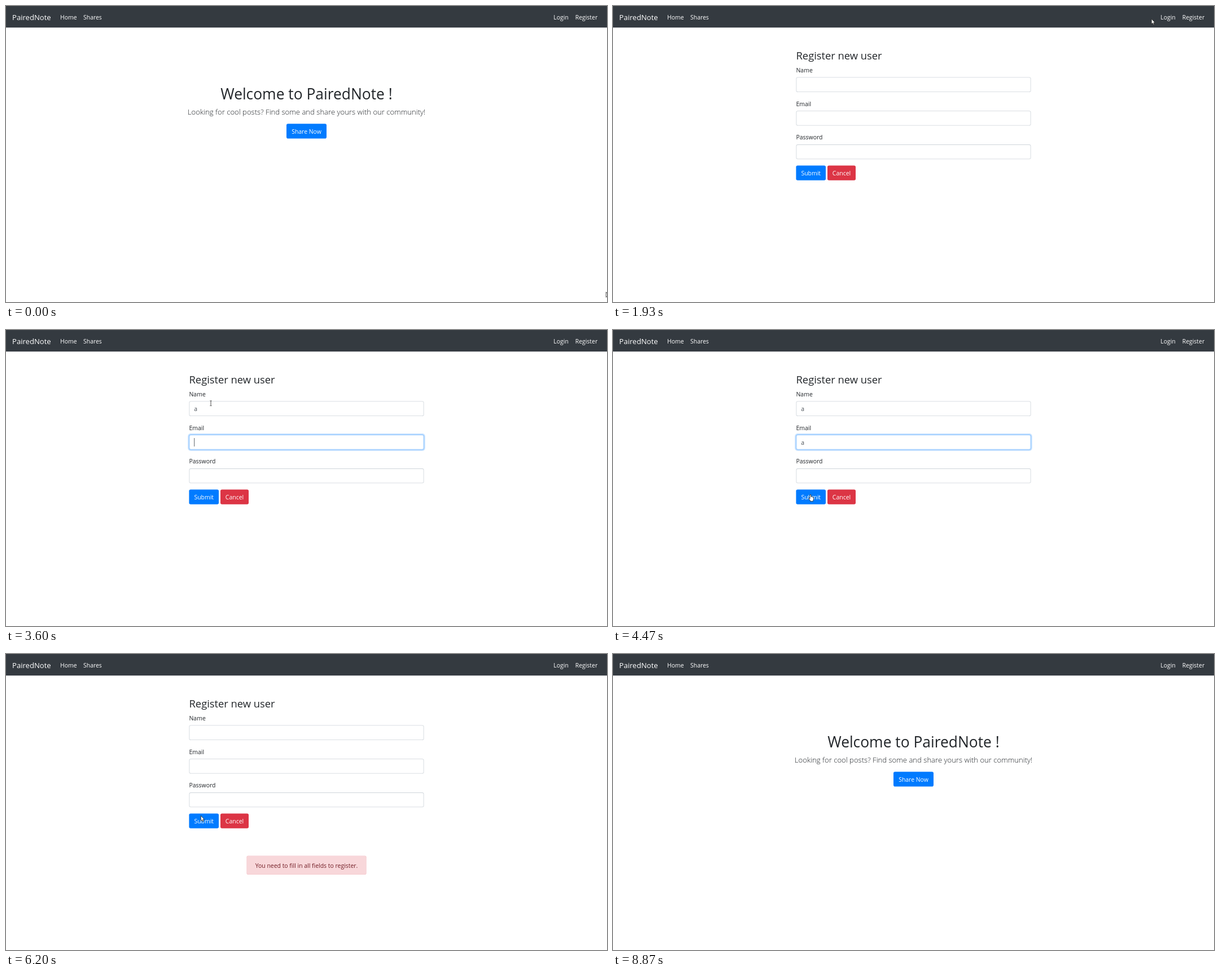
An HTML page with a canvas that plays this animation: 1065x526 px, repeating every 9470 ms.

```html
<!DOCTYPE html>
<html lang="en">
<head>
<meta charset="utf-8">
<title>PairedNote</title>
<style>
html, body { margin: 0; width: 100%; height: 100%; overflow: hidden; background: #fff; }
canvas { display: block; width: 1065px; height: 526px; }
</style>
</head>
<body>
<canvas id="stage"></canvas>
<script>
const W = 1065, H = 526, LOOP = 9470, STEP = 200 / 3;
const BRAND = 'PairedNote';
const canvas = document.getElementById('stage');
const ctx = canvas.getContext('2d');
const dpr = window.devicePixelRatio || 1;
canvas.width = W * dpr;
canvas.height = H * dpr;
ctx.scale(dpr, dpr);

// Moments at which the interface changes, in ms
const AT = {
  form: 1730, name: 2660, typeName: 3130, email: 3395, typeEmail: 3795,
  submit: 4595, reply: 5995, hover: 6995, leave: 7330, home: 8125, gone: 8860
};

// Pointer path: time, x, y
const PATH = [
  [0, 1063, 508], [530, 883, 290], [1000, 985, 73], [1200, 1022, 15], [1670, 1022, 15],
  [2000, 868, 33], [2470, 363, 130], [4200, 363, 130], [4470, 350, 292], [4670, 350, 292],
  [4930, 517, 295], [5000, 517, 295], [5200, 360, 297], [5530, 345, 287], [7000, 345, 287],
  [7330, 397, 288], [8130, 397, 288], [8330, 374, 293], [8530, 374, 293], [8870, 12, 528]
];

const BOX = {
  name: [324.5, 126.5, 416, 26.5],
  email: [324.5, 186.3, 416, 26.2],
  password: [324.5, 246.1, 416, 26.2],
  submit: [324.4, 283.5, 52.6, 26.3],
  cancel: [380, 283.5, 50, 26.3],
  share: [497, 209.2, 71, 26.3],
  alert: [426.4, 358.4, 212.2, 33.6],
  login: [968, 8, 33, 22],
  register: [1006, 8, 46, 22]
};

const clamp = v => Math.max(0, Math.min(1, v));
const between = (t, a, b) => t >= a && t < b;
const ease = v => v * v * (3 - 2 * v);
// 150 ms transition that turns on at a and off at b
const fade = (t, a, b) => ease(clamp((t - a) / 150)) - ease(clamp((t - b) / 150));

function mix(a, b, k) {
  return 'rgb(' + a.map((v, i) => Math.round(v + (b[i] - v) * k)) + ')';
}

function text(str, x, y, size, color, weight = 400, align = 'left') {
  ctx.font = `${weight} ${size}px "Open Sans", "Noto Sans", sans-serif`;
  ctx.fillStyle = color;
  ctx.textAlign = align;
  ctx.fillText(str, x, y);
}

function rounded([x, y, w, h], fill, grow = 0, r = 2.8) {
  ctx.beginPath();
  ctx.roundRect(x - grow, y - grow, w + 2 * grow, h + 2 * grow, r + grow);
  ctx.fillStyle = fill;
  ctx.fill();
}

function glow(box, k, alpha) {
  if (k > 0) rounded(box, `rgba(0,123,255,${alpha * k})`, 2.2 * k);
}

function caret(x, y) {
  ctx.fillStyle = '#495057';
  ctx.fillRect(x, y, 0.9, 15);
}

function button(box, label, color) {
  rounded(box, color);
  text(label, box[0] + box[2] / 2, box[1] + 17.7, 10.45, '#fff', 400, 'center');
}

function field(label, box, value, focus) {
  text(label, 324.5, box[1] - 8.8, 10.45, '#212529');
  glow(box, focus, 0.25);
  rounded(box, mix([206, 212, 218], [128, 189, 255], focus));
  rounded(box, '#fff', -0.8);
  if (value) text(value, 333.2, box[1] + 17.8, 10.45, '#495057');
}

function navbar() {
  ctx.fillStyle = '#343a40';
  ctx.fillRect(0, 0, W, 38.3);
  text(BRAND, 11, 24.7, 13.1, '#fff');
  text('Home', 96, 23.8, 10.45, '#fff');
  text('Shares', 137, 23.8, 10.45, '#fff');
  text('Login', 970.3, 23.8, 10.45, '#fff');
  text('Register', 1008.7, 23.8, 10.45, '#fff');
}

function home() {
  text(`Welcome to ${BRAND} !`, 532.5, 166, 26.4, '#212529', 400, 'center');
  text('Looking for cool posts? Find some and share yours with our community!',
    532.5, 192.8, 13.1, '#212529', 300, 'center');
  button(BOX.share, 'Share Now', '#007bff');
}

function form(t) {
  const typed = at => between(t, at, AT.reply) ? 'a' : '';
  const onName = fade(t, AT.name, AT.email);
  const onEmail = fade(t, AT.email, AT.submit);
  const onSubmit = t < AT.reply ? fade(t, AT.submit, AT.reply) : 0;

  text('Register new user', 324.5, 95.3, 18.35, '#212529');
  field('Name', BOX.name, typed(AT.typeName), onName);
  field('Email', BOX.email, typed(AT.typeEmail), onEmail);
  field('Password', BOX.password, '', 0);

  if (between(t, AT.name, AT.email)) caret(t < AT.typeName ? 333.3 : 339.2, 132);
  if (between(t, AT.email, AT.typeEmail)) caret(333.3, 192);
  if (between(t, AT.typeEmail, 3995)) caret(339.2, 192);

  const blue = Math.max(onSubmit, fade(t, AT.hover, AT.leave));
  glow(BOX.submit, onSubmit, 0.5);
  button(BOX.submit, 'Submit', mix([0, 123, 255], [0, 105, 217], blue));
  button(BOX.cancel, 'Cancel', mix([220, 53, 69], [200, 35, 51], fade(t, AT.leave, LOOP)));

  if (t >= AT.reply) {
    rounded(BOX.alert, '#f5c6cb');
    rounded(BOX.alert, '#f8d7da', -0.7);
    text('You need to fill in all fields to register.', 532.5, 379.6, 10.45, '#721c24', 400, 'center');
  }
}

// Monotone cubic through the path points, so pauses stay still
function pointer(t) {
  let i = 0;
  while (i < PATH.length - 2 && t >= PATH[i + 1][0]) i++;
  const slope = (j, c) => PATH[j] && PATH[j + 1]
    ? (PATH[j + 1][c] - PATH[j][c]) / (PATH[j + 1][0] - PATH[j][0]) : 0;
  const tangent = (j, c) => {
    const a = slope(j - 1, c), b = slope(j, c);
    return a * b > 0 ? 2 * a * b / (a + b) : 0;
  };
  const a = PATH[i], b = PATH[i + 1], span = b[0] - a[0];
  const u = clamp((t - a[0]) / span), k = ease(u);
  return [1, 2].map(c => a[c] + (b[c] - a[c]) * k
    + span * u * (1 - u) * ((1 - u) * tangent(i, c) - u * tangent(i + 1, c)));
}

function cursorKind(t, x, y, onForm) {
  if (between(t, AT.reply, 6725)) return 'arrow';
  const over = id => {
    const [bx, by, w, h] = BOX[id];
    return x >= bx && x <= bx + w && y >= by && y <= by + h;
  };
  const links = onForm ? ['submit', 'cancel'] : ['share'];
  if ([...links, 'login', 'register'].some(over)) return 'hand';
  return onForm && ['name', 'email', 'password'].some(over) ? 'beam' : 'arrow';
}

const SHAPE = {
  arrow: new Path2D('M.3 .3V9.6L2.4 7.7L3.8 10.8L5.2 10.2L3.9 7.2H6.5Z'),
  hand: new Path2D('M-1 1Q0 -.6 1 1V4.2Q2.2 3.8 2.6 4.7Q3.7 4.3 4 5.2Q5.4 4.9 5.4 6.4V9'
    + 'Q5.2 10.6 4.5 11.4V12.4H-.4V11.5L-2.8 8.1Q-3.4 6.8 -2.2 6.7L-1 7.7Z'),
  beam: new Path2D('M-1.6 -4.2H-.5L0 -3.8L.5 -4.2H1.6M0 -3.8V4.2M-1.6 4.6H-.5L0 4.2L.5 4.6H1.6')
};

function drawCursor(t, onForm) {
  const [x, y] = pointer(t);
  const kind = cursorKind(t, x, y, onForm);
  ctx.save();
  ctx.translate(x, y);
  ctx.lineWidth = 0.8;
  ctx.strokeStyle = '#222';
  ctx.fillStyle = '#fff';
  if (kind !== 'beam') ctx.fill(SHAPE[kind]);
  ctx.stroke(SHAPE[kind]);
  ctx.restore();
}

function draw(t) {
  const onForm = between(t, AT.form, AT.home);
  ctx.fillStyle = '#fff';
  ctx.fillRect(0, 0, W, H);
  navbar();
  if (onForm) form(t);
  else home();
  if (t < AT.gone) drawCursor(t, onForm);
}

const start = performance.now();
function tick() {
  const t = (performance.now() - start) % LOOP;
  draw(Math.floor(t / STEP + 0.01) * STEP);
  requestAnimationFrame(tick);
}
tick();
</script>
</body>
</html>
```
